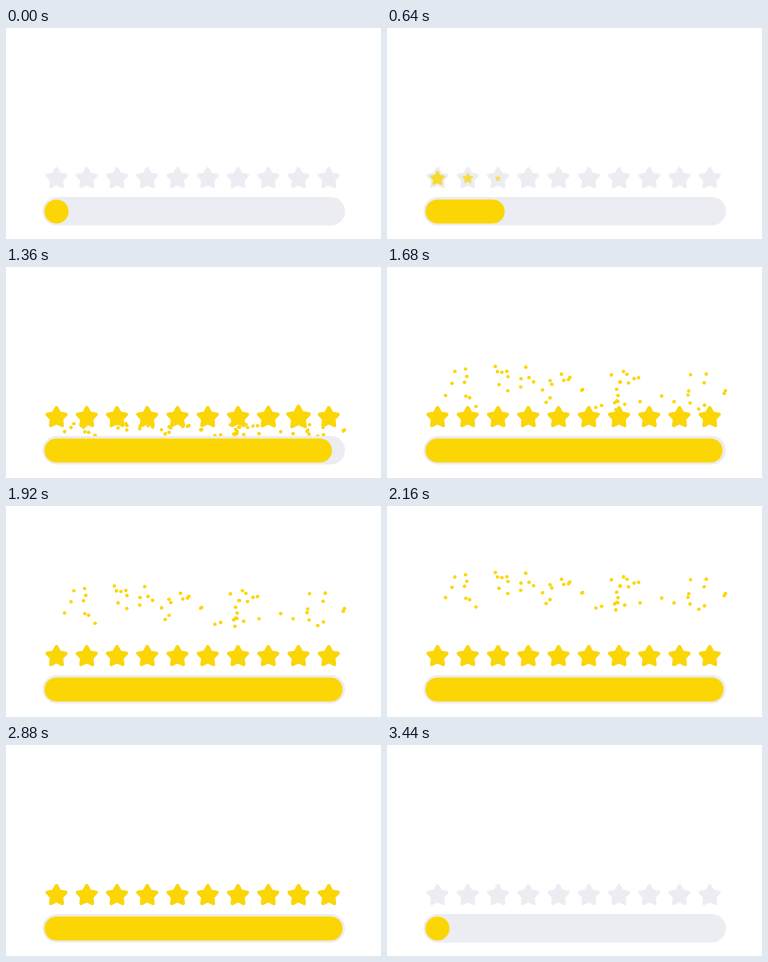
Recreate the animation shown at these times as an HTML page with a canvas. Size 375x211 px, loop 3.5 s.

```html
<!DOCTYPE html>
<html>
<head>
<meta charset="utf-8">
<title>Star progress</title>
<style>
  html, body { margin: 0; overflow: hidden; background: #fff; }
  canvas { display: block; }
</style>
</head>
<body>
<canvas id="stage" width="375" height="211"></canvas>
<script>
const ctx = document.getElementById('stage').getContext('2d');
const LOOP = 3500, RESET = 3200, GREY = '#ecedf2', GOLD = '#fbd504';
const RISE_START = 1240, RISE_END = 2880;

const clamp = v => Math.max(0, Math.min(1, v));
const span = (t, start, length) => clamp((t - start) / length);
const bump = p => Math.sin(Math.PI * p);

let seed = 7;
function random() {
  seed = (seed * 16807) % 2147483647;
  return seed / 2147483647;
}

// Two overlapping elliptical bursts; dy runs from -1 (top) to 1 (bottom)
const confetti = Array.from({ length: 62 }, (_, i) => {
  const angle = random() * 2 * Math.PI, radius = Math.sqrt(random());
  return {
    x: (i % 2 ? 262 : 118) + 80 * radius * Math.cos(angle),
    dy: radius * Math.sin(angle)
  };
});

// cubic-bezier(.7, 0, .1, 1), solved by bisection
function ease(p) {
  let lo = 0, hi = 1, s = p;
  for (let i = 0; i < 20; i++) {
    s = (lo + hi) / 2;
    const x = 2.1 * s * (1 - s) ** 2 + 0.3 * s * s * (1 - s) + s ** 3;
    if (x < p) lo = s; else hi = s;
  }
  return s * s * (3 - 2 * s);
}

function pill(x, y, w, h, color) {
  ctx.fillStyle = color;
  ctx.beginPath();
  ctx.roundRect(x, y, w, h, h / 2);
  ctx.fill();
}

function star(i, color, scale = 1, angle = 0, alpha = 1) {
  const point = (r, k) => [
    r * Math.sin(k * Math.PI / 5 + angle),
    -r * Math.cos(k * Math.PI / 5 + angle)
  ];
  ctx.save();
  ctx.translate(50.5 + 30.25 * i, 150.5);
  ctx.scale(scale, scale);
  ctx.globalAlpha = alpha;
  ctx.fillStyle = color;
  ctx.beginPath();
  for (let k = 0; k < 10; k += 2) {
    ctx.lineTo(...point(7, k - 1));
    ctx.arcTo(...point(13.3, k), ...point(7, k + 1), 1.6);
  }
  ctx.fill();
  ctx.restore();
}

function drawConfetti(t) {
  if (t < RISE_START || t >= RISE_END) return;
  const p = (t - 1360) / (RISE_END - 1360);
  const middle = 163 - 147 * p - 9 * Math.sin(2 * Math.PI * p);
  const spread = 28 * span(t, RISE_START, 400) * (1 - 0.4 * clamp(p));
  ctx.fillStyle = GOLD;
  ctx.globalAlpha = clamp((RISE_END - t) / 500);
  for (const { x, dy } of confetti) {
    ctx.beginPath();
    ctx.arc(x, middle + spread * dy, 1.8, 0, 2 * Math.PI);
    ctx.fill();
  }
  ctx.globalAlpha = 1;
}

function draw(t) {
  const back = span(t, RESET, 220);
  ctx.clearRect(0, 0, 375, 211);
  drawConfetti(t);

  pill(36.5, 169, 302.5, 28.5, GREY);
  const progress = ease(span(t, 0, 1840)) * (1 - ease(back));
  pill(38.5, 171.5, 24 + 274 * progress, 24, GOLD);

  for (let i = 0; i < 10; i++) star(i, GREY);
  for (let i = 0; i < 9; i++) {
    const age = t - 470 - 55 * i;
    if (age <= 0) continue;
    const scale = Math.sin(span(age, 0, 370) * Math.PI / 2) + 0.13 * bump(span(age, 340, 180));
    star(i, GOLD, scale, 0, clamp(0.5 + age / 520) * (1 - back));
  }

  // The last star spins in larger than the others
  if (t > 800) {
    const turn = 1 - (1 - span(t, 800, 500)) ** 4;
    const scale = span(t, 800, 160) + 0.55 * bump(span(t, 860, 440));
    star(9, GOLD, scale, turn * Math.PI * 2 / 5, 1 - back);
  }
}

function tick() {
  draw(performance.now() % LOOP);
  requestAnimationFrame(tick);
}
tick();
</script>
</body>
</html>
```
